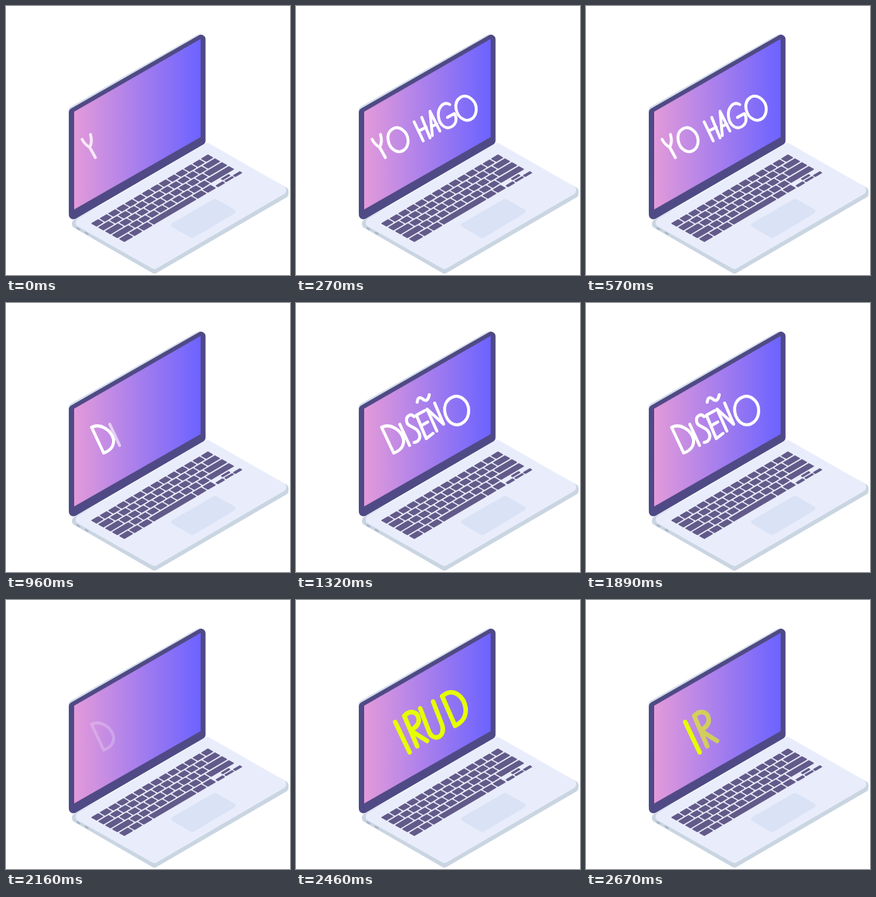
Recreate the animation shown at these times as an HTML page with a canvas. Size 375x355 px, loop 2.7 s.

```html
<!DOCTYPE html>
<html lang="es">
<head>
<meta charset="utf-8">
<title>Laptop</title>
<style>
  html, body { margin: 0; width: 100%; height: 100%; overflow: hidden; background: #fff; }
  canvas { display: block; }
</style>
</head>
<body>
<canvas id="stage" width="375" height="355"></canvas>
<script>
const ctx = document.getElementById('stage').getContext('2d');
const LOOP = 2700, STEP = 30, SWEEP = 270;

// Each word is a row of hand-drawn letters; an empty path is a space.
const words = [
  { from: -31, until: 600, color: '#fff', width: 3.8, letters: [
    'M100.5 176Q104 183 110.5 186.5M111.5 169.5Q114.5 179 110.5 186.5L118 200',
    'M128 162C137 157 148 167 148 178C148 189 139 195 131 191C121 186 117 168 128 162Z',
    '',
    'M156 153L168 178M166 147L177 174M162 165L172 160',
    'M180 171L177 139L190 165M179 159L186 156',
    'M203 130C195 125 187 134 188 145C189 157 198 164 206 159C212 155 213 148 209 142L200 147',
    'M218 120C227 116 238 125 238 136C238 147 230 153 222 150C211 146 206 127 218 120Z'
  ] },
  { from: 888, until: 1900, color: '#fff', width: 4, letters: [
    'M113 164L129 198M113 164C125 158 139 168 142 180C143 190 137 195 129 198',
    'M137 160L150 188',
    'M156 150C152 145 145 149 146 156C147 164 156 162 161 169C166 176 163 183 156 184',
    'M159 148L172 179L181 172M159 148L170 142M165 162L174 157',
    'M186 169L173 140L195 160L183 132M160 131C161 122 166 125 169 128C173 130 175 126 176 121',
    'M205 125C216 119 228 129 228 142C228 155 218 163 208 160C195 155 191 132 205 125Z'
  ] },
  { from: 2180, until: 2508, color: '#e6ff00', width: 6, letters: [
    'M131 161L150 201',
    'M143 153L160 193M143 153C151 144 161 148 162 157C163 165 157 169 151 172L173 186',
    'M164 143L175 172C180 188 198 182 193 165L181 134',
    'M193 127L210 166M193 127C208 114 222 128 224 143C225 156 218 162 210 166'
  ] }
];
for (const word of words) word.paths = word.letters.map(d => new Path2D(d));

function polygon(points, fill, radius = 0) {
  const n = points.length, last = points[n - 1], first = points[0];
  ctx.beginPath();
  ctx.moveTo((last[0] + first[0]) / 2, (last[1] + first[1]) / 2);
  points.forEach((p, i) => ctx.arcTo(...p, ...points[(i + 1) % n], radius));
  ctx.closePath();
  ctx.fillStyle = fill;
  ctx.fill();
}

// Keyboard plane: columns run up and right, rows run down and right.
const onKeys = (col, row) => [112 + col * 11.15 + row * 9.2, 287 - col * 6.57 + row * 5.1];

function key(col, row, width = 1, height = 1) {
  const right = col + width - 0.13, bottom = row + height - 0.18;
  polygon([onKeys(col, row), onKeys(right, row), onKeys(right, bottom), onKeys(col, bottom)], '#625a89', 0.8);
}

function keyRow(row, widths) {
  let col = 0;
  for (const w of widths) {
    key(col, row, w);
    col += w;
  }
}

const ones = n => Array(n).fill(1);

function drawKeyboard() {
  keyRow(0, ones(14));
  keyRow(1, [1.4, ...ones(11), 1.6]);
  keyRow(2, [1.7, ...ones(10), 2.3]);
  keyRow(3, [2.1, ...ones(9), 2.9]);
  keyRow(4, [1.2, 1.1, 1.2, 5.2, 1.2, 1.1]);
  key(11.05, 4.45, 1, 0.6);
  key(12.05, 4, 1.1, 0.52);
  key(12.05, 4.5, 1.1, 0.52);
  key(13.1, 4.45, 1, 0.6);
}

function drawLaptop() {
  polygon([[87, 284], [267, 185], [373, 241], [373, 251], [196, 354], [87, 291]], '#cad5e2', 5);
  polygon([[86, 286], [266, 180], [376, 243], [196, 348]], '#e9edfb', 6);
  polygon([[93, 291], [98, 294], [98, 297], [93, 294]], '#aab7c9', 1);
  polygon([[104, 297], [109, 300], [109, 303], [104, 300]], '#aab7c9', 1);
  drawKeyboard();
  polygon([[215, 289], [276, 254], [306, 271], [246, 307]], '#dae2f5', 3);

  polygon([[82.5, 134.5], [262, 32.5], [262, 178], [82.5, 284]], '#d5dfeb', 7);
  polygon([[83, 137], [263.5, 33.5], [263.5, 181], [83, 286]], '#4f4a85', 6);
  const glow = ctx.createLinearGradient(90, 0, 257, 0);
  glow.addColorStop(0, '#e39ada');
  glow.addColorStop(1, '#6c63ff');
  polygon([[90, 139.5], [257, 43.5], [257, 173], [90, 268.5]], glow);
}

const clamp = x => Math.min(1, Math.max(0, x));

function drawWord({ from, until, color, width, paths }, time) {
  const shown = clamp((time - from) / SWEEP) - clamp((time - until) / SWEEP);
  ctx.strokeStyle = color;
  ctx.lineWidth = width;
  paths.forEach((path, i) => {
    ctx.globalAlpha = clamp(shown * paths.length - i);
    ctx.stroke(path);
  });
  ctx.globalAlpha = 1;
}

function draw(time) {
  ctx.fillStyle = '#fff';
  ctx.fillRect(0, 0, 375, 355);
  drawLaptop();
  ctx.lineCap = ctx.lineJoin = 'round';
  for (const word of words) drawWord(word, time);
}

const start = performance.now();
function tick() {
  const time = (performance.now() - start) % LOOP;
  draw(Math.floor(time / STEP) * STEP);
  requestAnimationFrame(tick);
}
tick();
</script>
</body>
</html>
```
